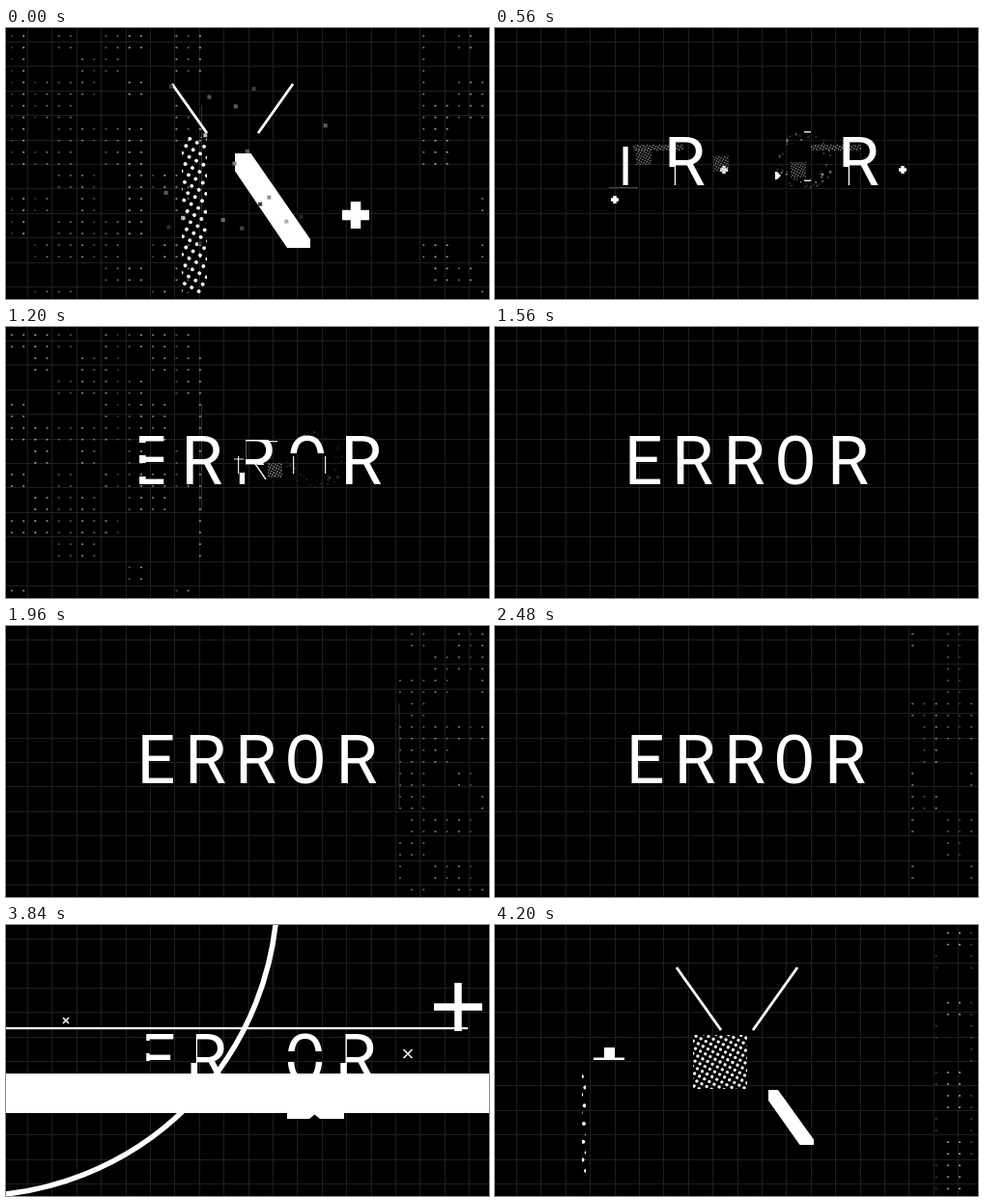
Write an HTML page with a canvas that moves like this. It is 500 px wide and 281 px high and loops after 4240 ms.

```html
<!DOCTYPE html>
<html lang="en">
<head>
<meta charset="utf-8">
<title>Error</title>
<style>
html, body { margin: 0; width: 100%; height: 100%; overflow: hidden; background: #000; }
canvas { display: block; width: 500px; height: 281px; }
</style>
</head>
<body>
<canvas id="stage" width="500" height="281" role="img" aria-label="ERROR"></canvas>
<script>
const LOOP = 4240, STEP = 40;
const c = document.getElementById('stage').getContext('2d');

// Piecewise linear value at time t: key(t, t0, v0, t1, v1, ...)
function key(t, ...k) {
  if (t <= k[0]) return k[1];
  for (let i = 2; i < k.length; i += 2) {
    if (t <= k[i]) return k[i - 1] + (k[i + 1] - k[i - 1]) * (t - k[i - 2]) / (k[i] - k[i - 2]);
  }
  return k[k.length - 1];
}

function hash(a, b = 0, d = 0) {
  const v = Math.sin(a * 12.9898 + b * 78.233 + d * 37.719) * 43758.5453;
  return v - Math.floor(v);
}

const within = (t, a, b) => t >= a && t < b;
const ink = (v, a = 1) => { c.fillStyle = c.strokeStyle = `rgba(${v},${v},${v},${a})`; };
const box = (x, y, w, h) => c.fillRect(x, y, w, h);

function line(x1, y1, x2, y2, w) {
  c.lineWidth = w;
  c.beginPath();
  c.moveTo(x1, y1);
  c.lineTo(x2, y2);
  c.stroke();
}

function shape(...p) {
  c.beginPath();
  for (let i = 0; i < p.length; i += 2) c.lineTo(p[i], p[i + 1]);
  c.fill();
}

function plus(x, y, size, w) {
  box(x - size / 2, y - w / 2, size, w);
  box(x - w / 2, y - size / 2, w, size);
}

function cross(x, y, r) {
  line(x - r, y - r, x + r, y + r, 1.6);
  line(x - r, y + r, x + r, y - r, 1.6);
}

// Tilted lattice of dots cut to a rectangle
function halftone(x, y, w, h, pitch, r) {
  c.save();
  c.beginPath();
  c.rect(x, y, w, h);
  c.clip();
  c.translate(x + w / 2, y + h / 2);
  c.rotate(0.5);
  const n = Math.ceil(Math.hypot(w, h) / 2 / pitch);
  c.beginPath();
  for (let i = -n; i <= n; i++) {
    for (let j = -n; j <= n; j++) {
      c.moveTo(i * pitch + r, j * pitch);
      c.arc(i * pitch, j * pitch, r, 0, 7);
    }
  }
  c.fill();
  c.restore();
}

function grid() {
  ink(30);
  for (let i = 0; i < 19; i++) box(Math.round(22 + i * 25.4), 0, 1, 281);
  for (let j = 0; j < 11; j++) box(0, Math.round(14 + j * 25.4), 500, 1);
}

// Blinking dots that sweep in from one side of the stage
function panel(right, t, start, end, grow = 200) {
  if (!within(t, start, end)) return;
  const beat = Math.floor(t / 120);
  const count = right ? 8 : 17;
  const shown = Math.min(1, (t - start) / grow) * count;
  const fade = key(t, end - 120, 1, end, .2);
  for (let n = 0; n < Math.floor(shown); n++) {
    const i = right ? 40 - n : n;
    for (let j = 0; j < 23; j++) {
      if (hash(i >> 1, j >> 1, beat) > .55) continue;
      ink(220, fade * (.25 + .5 * hash(i, beat)));
      box(5 + i * 12.18, 7.5 + j * 12.05, 2, 1.6);
    }
  }
  ink(50);
  if (shown === count) box(right ? 406.5 : 202, 80, 1, 110);
}

function panels(t, u) {
  panel(false, u, -40, 360, 40);
  panel(true, u, -160, 360);
  panel(false, t, 1000, 1440);
  panel(true, t, 1720, 2160);
  panel(true, t, 2320, 2720);
  panel(false, t, 3040, 3440);
}

// Large pieces that fly in before the word
function opening(u) {
  ink(255);
  if (within(u, -160, 80)) {
    const mid = key(u, -40, 250.5, 0, 234.5, 80, 215);
    const gap = key(u, -160, 0, -40, 16.5, 0, 26.5, 80, 50);
    const y = key(u, -160, 108, -120, 13, -40, 44, 0, 58, 80, 109);
    for (const side of [-1, 1]) {
      line(mid + side * (gap + (108.5 - y) / 1.4), y, mid + side * gap, 109, 2.8);
    }
  }

  // diagonal that shrinks into the leg of a letter
  if (within(u, -120, 400)) {
    const l = key(u, -120, 322, -40, 283, 0, 237, 400, 200);
    const y = key(u, -120, 220, -40, 171, 0, 130, 400, 141);
    const r = key(u, -40, 330, 0, 315, 400, 216);
    const b = key(u, 0, 228, 400, 163);
    const a = key(u, -120, 3, -40, 10, 0, 16.5, 400, 4);
    shape(l, y, l + a, y, r, b - .55 * a, r, b, r - 1.45 * a, b, l, y + 1.1 * a);
  }

  if (within(u, -80, 0)) {
    box(113, 127, 11, 11);
    box(102, 137.5, 32, 2.5);
  }
  if (within(u, -120, 0)) {
    const s = key(u, -120, 10, -40, 56);
    halftone(233 - s / 2, 142 - s / 2, s, s, 5.8, 1.6);
  }
  if (within(u, -40, 440)) {
    halftone(
      key(u, -40, 90, 0, 182, 400, 143), key(u, -40, 152, 0, 113, 400, 121),
      key(u, -40, 4, 0, 26, 400, 52), key(u, -40, 108, 0, 162, 400, 6),
      key(u, 0, 8.4, 400, 2.8), key(u, 0, 1.9, 400, .8));
  }
  if (within(u, 0, 760)) {
    plus(key(u, 0, 362, 400, 422), key(u, 0, 194, 400, 147),
      key(u, 0, 28, 400, 8), key(u, 0, 10.5, 400, 3.5));
  }
  if (within(u, 0, 320)) {
    const spread = key(u, 0, 1, 320, 1.25);
    for (let i = 0; i < 18; i++) {
      ink(40 + 160 * hash(i, 2) ** 2, key(u, 80, 1, 320, 0));
      box(248 + (hash(i, 4) - .5) * 170 * spread, 140 + (hash(i, 6) - .5) * 170 * spread, 4, 4);
    }
  }
}

// Small scraps around the word
function debris(t) {
  ink(255);
  if (within(t, 320, 760)) {
    plus(124, 178, 8, 3.5);
    plus(237, 147, 8, 3.5);
    shape(290, 149, 292, 149, 296, 153, 292, 157, 290, 157);
  }
  if (within(t, 440, 760)) {
    ink(130);
    for (const x of [143, 327]) halftone(x, 121, 52, 6, 2.8, .9);
    for (const k of [0, 1, 2]) halftone(146 + k * 80, 126 + k * 6.5, 16, 16, 2.6, .8);
    ink(75);
    box(118, 165, 30, 1);
    ink(220);
    for (const y of [107, 157.5]) box(320, y, 7, 1.5);
  }
  if (within(t, 1080, 1320)) {
    ink(130);
    halftone(271, 141, 15, 15, 2.8, .9);
    ink(235);
    box(236, 136.5, 10, 1);
    box(272, 118, 9, 1.2);
    line(256, 139, 269, 158, 1.4);
    for (const x of [240, 297, 330]) box(x, 134, 1.2, 18);
  }
  if (within(t, 440, 1320)) {
    const fade = key(t, 440, .2, 560, .7, 1200, .3, 1320, 0);
    for (let i = 0; i < 55; i++) {
      const a = hash(i, 3) * 6.283 + t / 2500, r = 20 + 10 * hash(i, 5), s = 1 + hash(i, 7) * 1.6;
      ink(200, fade * hash(i, 9));
      box(319 + r * Math.cos(a), 137 + r * Math.sin(a), s, s);
    }
  }
}

const SANS = '70px Roboto, sans-serif';
const MONO = '70px "Noto Sans Mono", monospace';
const arms = (x, w) => [0, 21, 43].map(y => [x, y - 1, w, 8]);

// Visible pieces of each letter, measured from its top left corner
const pieces = {
  E(t) {
    if (t >= 3640) return arms(4, 32);
    if (t < 640) return t < 400 ? [] : [[-1, 10, 7, 41]];
    return t < 1320 ? arms(-1, key(t, 640, 7, 1040, 27)) : null;
  },
  R(t) {
    if (t < 640) return [[-1, -1, 8, 32], [6, -1, key(t, 240, 0, 480, 40), 54]];
    return t >= 3720 ? [[6, -1, 40, 54], [-1, 30, 8, 24]] : null;
  },
  core(t) {
    if (t < 1080 || t >= 3640) return [];
    return t < 1320 ? [[7, 4, 30, 26], [-1, 38, 7, 14]] : null;
  },
  O(t) {
    if (t >= 3680) return [[-3, -3, 56, 21], [-3, 29, 56, 30]];
    return t < 1320 ? [[-3, -3, 56, key(t, 960, 0, 1200, 21, 1320, 56)]] : null;
  }
};

function letter(glyph, home, t, cut = pieces[glyph]) {
  const cuts = cut(t);
  const pull = glyph === 'E' ? .5 : 1; // the first letter drifts less
  const stretch = key(t, 560, .15, 1200, .055, 1960, 0, 3080, -.012);
  c.save();
  c.translate(home + (home - 258) * stretch * pull, 113);
  if (cuts) {
    c.beginPath();
    for (const r of cuts) c.rect(...r);
    c.clip();
  }
  c.font = glyph === 'O' ? MONO : SANS;
  c.fillText(glyph, c.measureText(glyph).actualBoundingBoxLeft, 50);
  c.restore();
}

function word(t) {
  if (!within(t, 240, 3960)) return;
  ink(255);
  c.save();
  c.beginPath();
  c.rect(0, 0, 500, key(t, 3760, 281, 3800, 170, 3840, 154, 3960, 100));
  c.clip();
  letter('E', 140.5, t);
  letter('R', 190, t);
  letter('R', 242, t, pieces.core);
  letter('O', 292, t);
  letter('R', 346.5, t);
  c.restore();
}

// Sweep that wipes the word away
function closing(t) {
  if (!within(t, 3640, 4040)) return;
  ink(255);
  c.lineWidth = 5.5;
  c.beginPath();
  c.arc(-36, -36, key(t, 3640, 50, 3840, 317, 4000, 640), 0, 7);
  c.stroke();

  const from = key(t, 3840, 0, 3960, 500);
  box(from, 106, Math.max(0, key(t, 3720, 0, 3840, 478, 3880, 500) - from), 2.2);

  const size = key(t, 3720, 0, 3840, 50, 3960, 0);
  plus(468, 85, size, size * .15);
  if (within(t, 3720, 3960)) {
    cross(62, 99, 3);
    cross(416, 133.5, 4.5);
  }

  const h = key(t, 3760, 0, 3840, 41, 3960, 0);
  box(0, 174.5 - h / 2, 500, h);
  if (within(t, 3800, 3880)) shape(291, 194, 350, 194, 350, 201, 325, 201, 319.5, 196.5, 314, 201, 291, 201);
}

function draw(now) {
  const t = Math.floor(now % LOOP / STEP) * STEP;
  const u = t > 4040 ? t - LOOP : t; // the opening starts before the loop point
  ink(0);
  box(0, 0, 500, 281);
  grid();
  panels(t, u);
  opening(u);
  debris(t);
  word(t);
  closing(t);
}

let start;
function tick(now) {
  start ??= now;
  draw(now - start);
  requestAnimationFrame(tick);
}
draw(0);
requestAnimationFrame(tick);
</script>
</body>
</html>
```
